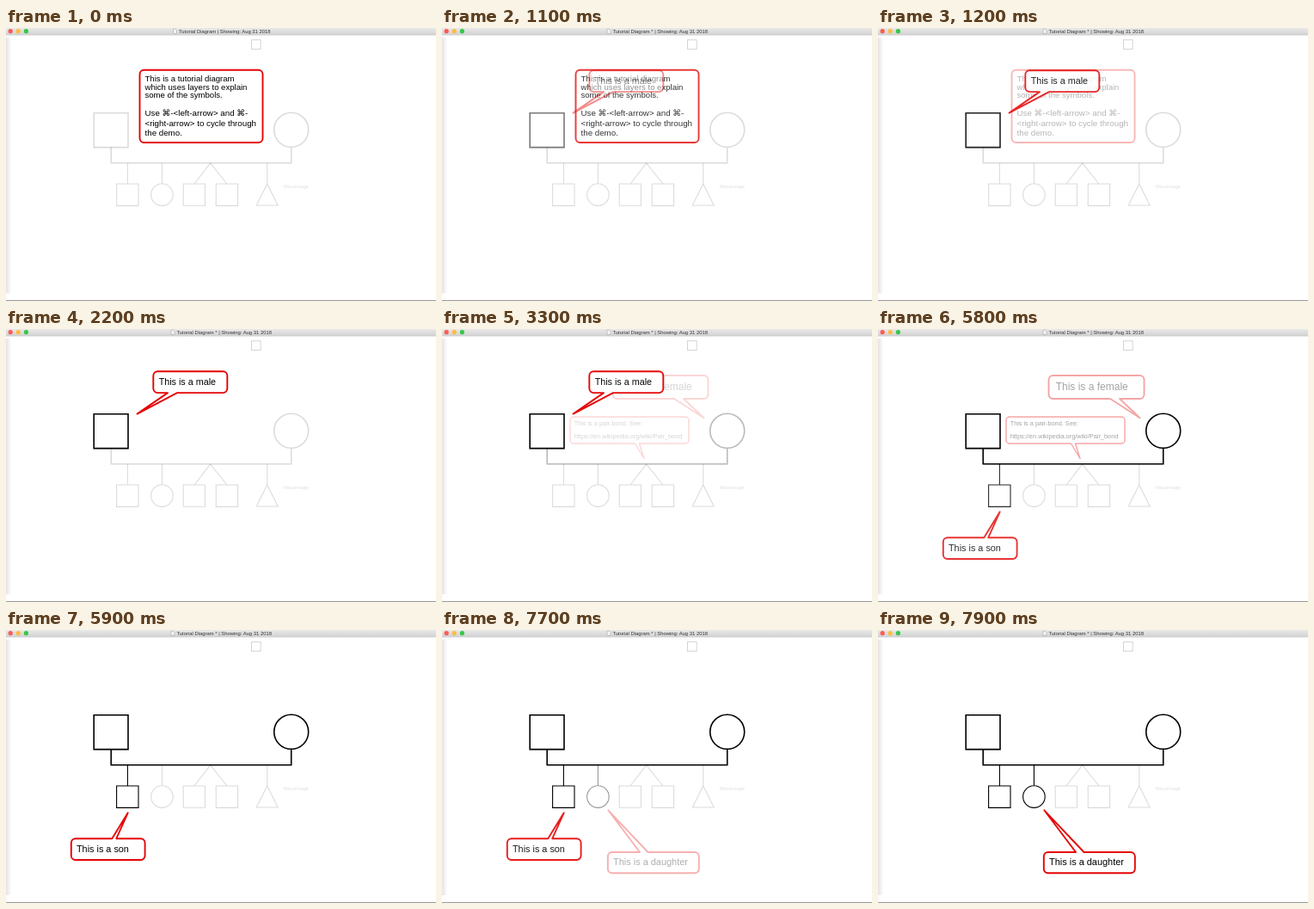
An HTML page that plays this animation: 500x317 px, repeating every 8 s.

```html
<!DOCTYPE html>
<html lang="en">
<head>
<meta charset="utf-8">
<title>Tutorial Diagram</title>
<style>
  html, body { margin: 0; width: 100%; height: 100%; overflow: hidden; background: #fff; }
  svg { display: block; width: 100vw; height: 100vh; }
  text { font-family: "Liberation Sans", Arial, sans-serif; white-space: pre; }
  .key { font-family: "DejaVu Sans", sans-serif; }
</style>
</head>
<body>
<svg id="stage" viewBox="0 0 500 317">
  <defs>
    <linearGradient id="bar" x2="0" y2="1">
      <stop stop-color="#e9e9e9"/><stop offset="1" stop-color="#d2d2d2"/>
    </linearGradient>
    <linearGradient id="shade">
      <stop stop-color="#e4e4e4"/><stop offset="1" stop-color="#fff"/>
    </linearGradient>
  </defs>
  <rect width="500" height="317" fill="#fff"/>
  <rect y="11" width="6.5" height="297" fill="url(#shade)"/>
  <rect width="500" height="8" fill="url(#bar)"/>
  <path d="M0 8.2H500" stroke="#c2c2c2" stroke-width=".6"/>
  <path d="M0 316.5H500" stroke="#999"/>
  <circle cx="5.2" cy="3.7" r="2.6" fill="#fc5b57"/>
  <circle cx="14.2" cy="3.7" r="2.6" fill="#fdbc40"/>
  <circle cx="23.4" cy="3.7" r="2.6" fill="#34c84a"/>
  <g id="heading">
    <path d="M-6.5 1.2h2.6l1.4 1.4v3.8h-4z" fill="#f4f4f4" stroke="#999" stroke-width=".5"/>
    <text id="title" y="5.7" font-size="5.86" fill="#333"></text>
  </g>
  <rect x="285.5" y="13.8" width="10.6" height="10.8" fill="none" stroke="#d4d4d4"/>
  <g id="diagram" fill="none" stroke="#000"></g>
  <text x="323" y="185.6" font-size="5.6" fill="#dedede">Miscarriage</text>
  <g id="callouts"></g>
</svg>
<script>
const LOOP = 8000, STEP = 100, FAINT = 0.14, RED = "#e40404";
const $ = id => document.getElementById(id);

function add(parent, tag, attrs) {
  const node = document.createElementNS("http://www.w3.org/2000/svg", tag);
  for (const [name, value] of Object.entries(attrs)) node.setAttribute(name, value);
  return parent.appendChild(node);
}

const box = (x, y, size) => `M${x} ${y}h${size}v${size}h${-size}z`;
const ring = (x, y, r) => `M${x - r} ${y}a${r} ${r} 0 1 1 ${2 * r} 0a${r} ${r} 0 1 1 ${-2 * r} 0z`;

// Each part turns solid at its stage; a missing stage leaves it faint.
const parts = [
  { stage: 1, width: 1.6, d: box(102.2, 98.8, 39.8) },
  { stage: 2, width: 1.6, d: "M122.2 138.6V156.8H331.7V138.4" + ring(331.7, 118.3, 20) },
  { stage: 3, width: 1.1, d: "M141.4 157V181" + box(128.6, 181, 25.4) },
  { stage: 4, width: 1.1, d: "M181.4 157V181" + ring(181.4, 193.6, 12.8) },
  { width: 1.1, d: "M219 181L237.6 157L257 181" + box(206.2, 181, 25.2) + box(244.2, 181, 25.4) },
  { width: 1.1, d: "M303.7 157V181M303.7 181L316.2 206H291.2Z" }
];
for (const part of parts) {
  part.node = add($("diagram"), "path", { d: part.d, "stroke-width": part.width });
}

function bubble({ x, y, w, h, r = 5, side, base, tip, width = 1.9 }) {
  const right = x + w, bottom = y + h;
  const corner = (dx, dy) => `a${r} ${r} 0 0 1 ${dx} ${dy}`;
  const above = side === "top" ? `H${base[0]}L${tip}L${base[1]} ${y}` : "";
  const below = side === "bottom" ? `H${base[1]}L${tip}L${base[0]} ${bottom}` : "";
  const d = `M${x + r} ${y}${above}H${right - r}${corner(r, r)}V${bottom - r}${corner(-r, r)}` +
    `${below}H${x + r}${corner(-r, -r)}V${y + r}${corner(r, -r)}z`;
  return { d, fill: "#fff", stroke: RED, "stroke-width": width, "stroke-linejoin": "round" };
}

// Lines are [x, baseline, size, text].
const callouts = [
  { stage: 2, x: 198.5, y: 54, w: 111, h: 27, side: "bottom", base: [270, 281], tip: [304.5, 103.3],
    lines: [[206.7, 71, 12, "This is a female"]] },
  { stage: 2, x: 149, y: 102, w: 138, h: 31, r: 4, width: 1.4, side: "bottom", base: [224.5, 229.5], tip: [235, 150.5],
    lines: [[153.7, 112.3, 7.3, "This is a pair-bond. See:"],
            [153.7, 127, 7.4, "https://en.wikipedia.org/wiki/Pair_bond"]] },
  { stage: 0, x: 155.5, y: 48.8, w: 143, h: 84.2,
    lines: [[161.5, 62.2, 9.55, "This is a tutorial diagram"],
            [161.5, 71.6, 9.55, "which uses layers to explain"],
            [161.5, 81, 9.55, "some of the symbols."],
            [161.5, 102.4, 9.75, "Use ⌘-<left-arrow> and ⌘-"],
            [161.5, 113.6, 9.75, "<right-arrow> to cycle through"],
            [161.5, 124.8, 9.75, "the demo."]] },
  { stage: 1, x: 171.3, y: 49.3, w: 86, h: 24.8, side: "bottom", base: [188, 199], tip: [152.5, 98.6],
    lines: [[177.7, 65.2, 10.75, "This is a male"]] },
  { stage: 3, x: 75.8, y: 242.2, w: 85.8, h: 24.8, side: "top", base: [123.3, 128.3], tip: [141.7, 212.3],
    lines: [[82, 257.8, 10.85, "This is a son"]] },
  { stage: 4, x: 192.8, y: 258, w: 106, h: 24.2, side: "top", base: [230, 239.5], tip: [193.3, 209.3],
    lines: [[199, 273.4, 10.95, "This is a daughter"]] }
];
for (const callout of callouts) {
  callout.node = add($("callouts"), "g", {});
  add(callout.node, "path", bubble(callout));
  for (const [x, y, size, content] of callout.lines) {
    const text = add(callout.node, "text", { x, y, "font-size": size });
    for (const run of content.split(/(⌘)/)) {
      add(text, "tspan", run === "⌘" ? { class: "key" } : {}).textContent = run;
    }
  }
}

// Start of every cross-fade and its progress at each step.
const fades = [
  null,
  { start: 1100, levels: [0.3, 0.65, 0.95, 1] },
  { start: 3300, levels: [0.1, 0.4, 0.7, 1] },
  { start: 5800, levels: [0.6, 1] },
  { start: 7700, levels: [0.2, 0.6, 1] }
];

function progress(stage, time) {
  if (stage === 0) return 1;
  const fade = fades[stage];
  if (!fade || time < fade.start) return 0;
  const step = Math.floor((time - fade.start) / STEP);
  return fade.levels[Math.min(step, fade.levels.length - 1)];
}

const appear = p => Math.sin(p * Math.PI / 2);
const vanish = p => 1 - p * p * (3 - 2 * p);

function render(time) {
  for (const { stage, node } of parts) {
    node.setAttribute("stroke-opacity", FAINT + (1 - FAINT) * appear(progress(stage, time)));
  }
  for (const { stage, node } of callouts) {
    node.setAttribute("opacity", appear(progress(stage, time)) * vanish(progress(stage + 1, time)));
  }
  const edited = time >= fades[1].start;
  $("title").textContent = `Tutorial Diagram${edited ? " *" : ""} | Showing: Aug 31 2018`;
  $("heading").setAttribute("transform", `translate(${edited ? 198.5 : 201} 0)`);
}

const began = performance.now();
function tick() {
  render((performance.now() - began) % LOOP);
  requestAnimationFrame(tick);
}
tick();
</script>
</body>
</html>
```
